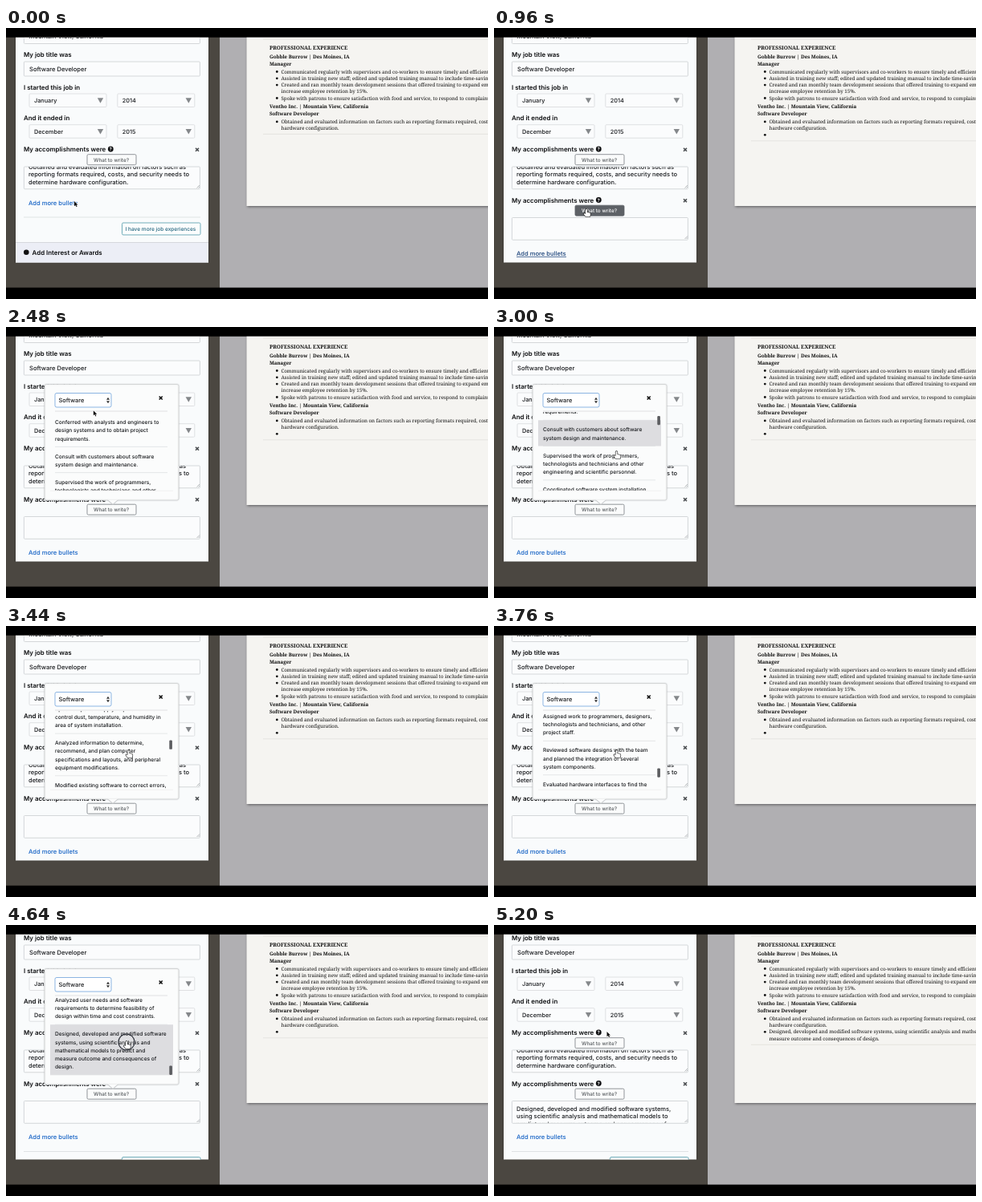
Recreate the animation shown at these times as an HTML page with a canvas. Size 600 by 338 pixels, loop 5.24 s.

```html
<!DOCTYPE html>
<html lang="en">
<head>
<meta charset="utf-8">
<title>Resume builder</title>
<style>
html, body { margin: 0; width: 100%; height: 100%; overflow: hidden; background: #000; }
canvas { display: block; width: 600px; height: 338px; }
</style>
</head>
<body>
<canvas id="stage"></canvas>
<script>
const LOOP = 5240;
const canvas = document.getElementById('stage');
const c = canvas.getContext('2d');
const dpr = window.devicePixelRatio || 1;
canvas.width = 600 * dpr;
canvas.height = 338 * dpr;

const SANS = 'Inter, "Open Sans", sans-serif';
const SERIF = '"Noto Serif", serif';
const INK = '#17191c', LINK = '#1260c4';

// moments of the interaction
const ADDED = 360, OPENED = 1160, LISTED = 1640, CHOSEN = 2320, FILLED = 4680;
const CLICKS = [220, 1020, LISTED, 2200, 4540];

// time, x, y of the pointer tip
const POINTER = [
  [0, 85, 216], [700, 86, 217], [920, 115, 226], [1140, 115, 226], [1580, 123, 95],
  [1860, 123, 95], [2160, 107, 102], [2440, 107, 102], [2780, 152.5, 155],
  [3900, 152.5, 155], [4180, 150, 145], [4720, 150, 145], [5120, 140.5, 133], [LOOP, 140.5, 133]
];
const LIST_SCROLL = [[2970, 0], [3000, 32.5], [3440, 300.9], [3900, 1e4]];
const SECTORS = ['Restaurant', 'Software', 'Finance', 'Education', 'Retail',
  'Marketing', 'Sales', 'Accounting', 'Public Relations'];

const split = s => s.trim().split('\n').map(item => item.split('/'));
const RESTAURANT = split(`
Arranged food for co-workers requested by/guests at the gala; makes donor events.
Communicated regularly with supervisors/and co-workers to ensure timely and/efficient work at large-scale events.
Conducted regular detailed inventory of/stock to ensure accurate documentation for/weekly supply orders.`);
const SOFTWARE = split(`
Conferred with analysts and engineers to/design systems and to obtain project/requirements.
Consult with customers about software/system design and maintenance.
Supervised the work of programmers,/technologists and technicians and other/engineering and scientific personnel.
Coordinated software system installation/and monitored equipment functioning to/ensure specifications were met.
Stored, retrieved, and manipulated data/for analysis of system capabilities and/requirements.
Trained users to work with new or/modified equipment and wrote clear/operating instructions.
Determined system performance standards/and reported on the progress of every/project.
Specified power supply requirements to/control dust, temperature, and humidity in/area of system installation.
Analyzed information to determine,/recommend, and plan computer/specifications and layouts, and peripheral/equipment modifications.
Modified existing software to correct errors,/adapt it to new hardware, or upgrade/interfaces and improve performance.
Developed and directed software system/testing and validation procedures,/programming, and documentation.
Monitored functioning of equipment to/ensure the system operates in conformance/with specifications.
Prepared reports and correspondence about/project specifications, activities, and/status.
Obtained and evaluated information on/factors such as reporting formats required,/costs, and security needs.
Assigned work to programmers, designers,/technologists and technicians, and other/project staff.
Reviewed software designs with the team/and planned the integration of several/system components.
Evaluated hardware interfaces to find the/operational requirements and the expected/system performance.
Analyzed user needs and software/requirements to determine feasibility of/design within time and cost constraints.
Designed, developed and modified software/systems, using scientific analysis and/mathematical models to predict and/measure outcome and consequences of/design.`);
const itemHeight = lines => lines.length * 10.2 + 11.8;
const total = items => items.reduce((sum, lines) => sum + itemHeight(lines), 0);

const ARROW = new Path2D('M0 0v6.2l1.5-1.3 1.1 2.4 1-.5-1.1-2.3h2z');
const HAND = new Path2D('M-1 1a1 1 0 0 1 2 0v3l3 .6q1.2 .3 1 1.6l-.6 3H-.8l-2.4-3q0-1.2 1.2-.9l1 .8z');

function ramp(keys, t, ease = k => k) {
  const i = keys.findIndex(k => k[0] > t);
  if (i === 0) return keys[0].slice(1);
  if (i < 0) return keys[keys.length - 1].slice(1);
  const a = keys[i - 1], b = keys[i], k = ease((t - a[0]) / (b[0] - a[0]));
  return a.slice(1).map((v, n) => v + (b[n + 1] - v) * k);
}
const smooth = k => k * k * (3 - 2 * k);

function text(s, x, y, size = 7.5, color = INK, weight = 500, family = SANS) {
  c.font = `${weight} ${size}px ${family}`;
  c.fillStyle = color;
  c.fillText(s, x, y);
}
const label = (s, y, x = 22) => text(s, x, y, 7.9, '#0c0d0f', 600);

function box(x, y, w, h, fill, stroke, r = 0) {
  c.beginPath();
  c.roundRect(x, y, w, h, r);
  if (fill) { c.fillStyle = fill; c.fill(); }
  if (stroke) { c.strokeStyle = stroke; c.lineWidth = .8; c.stroke(); }
}
function shadowed(alpha, blur, offset, draw) {
  c.save();
  c.shadowColor = `rgba(0,0,0,${alpha})`;
  c.shadowBlur = blur * dpr;
  c.shadowOffsetY = offset * dpr;
  draw();
  c.restore();
}
function line(x1, y1, x2, y2, color, width = .7) {
  c.beginPath();
  c.moveTo(x1, y1);
  c.lineTo(x2, y2);
  c.strokeStyle = color;
  c.lineWidth = width;
  c.stroke();
}
function disc(x, y, r, color) {
  c.beginPath();
  c.arc(x, y, r, 0, 7);
  c.fillStyle = color;
  c.fill();
}
function triangle(x, y, w, h, color) {
  c.beginPath();
  c.moveTo(x - w / 2, y);
  c.lineTo(x + w / 2, y);
  c.lineTo(x, y + h);
  c.fillStyle = color;
  c.fill();
}
function cross(x, y, color) {
  line(x - 2, y - 2, x + 2, y + 2, color, 1.6);
  line(x - 2, y + 2, x + 2, y - 2, color, 1.6);
}
function clipped(x, y, w, h, draw) {
  c.save();
  c.beginPath();
  c.rect(x, y, w, h);
  c.clip();
  draw();
  c.restore();
}

function field(y, h) { box(22.4, y, 219, h, '#fbfcfd', '#cbced1', 1); }
function select(s, x, y) {
  box(x, y, 96, 16.5, '#fbfcfd', '#d8dadc', 1);
  text(s, x + 6, y + 11.4, 7.3);
  triangle(x + 88.5, y + 5.2, 7.4, 6.6, '#85888b');
}

function accomplishment(y, lines, first, hover) {
  label('My accomplishments were', y + 3);
  disc(130.3, y, 3.4, '#0c0d0f');
  text('?', 128.6, y + 2.3, 6, '#fff', 700);
  cross(238, y + .7, '#4a4d50');
  field(y + 22, 27.8);
  line(237.5, y + 48.5, 241, y + 45, '#8a8d90', .6);
  line(239.5, y + 48.5, 241, y + 47, '#8a8d90', .6);
  clipped(22, y + 22.3, 220, 27, () =>
    lines.forEach((s, i) => text(s, 28, y + first + i * 9.5)));
  box(101, y + 6.7, 61, 13, hover ? '#5d6166' : '#fafbfb', hover ? '#5d6166' : '#777b80', 1.5);
  text('What to write?', 109, y + 15.6, 6.4, hover ? '#fff' : '#54585c');
}

function form(t, added) {
  field(0, 19.5);
  text('Mountain View, California', 28.5, 13, 7.6);
  label('My job title was', 36);
  field(42, 18);
  text('Software Developer', 29, 54, 7.55);
  label('I started this job in', 77);
  select('January', 29, 82);
  select('2014', 138.8, 82);
  label('And it ended in', 115);
  select('December', 29, 120.7);
  select('2015', 138.8, 120.7);
  accomplishment(151, ['Obtained and evaluated information on factors such as',
    'reporting formats required, costs, and security needs to',
    'determine hardware configuration.'], 24.9);
  if (added) {
    const hover = t > 860 && t < OPENED;
    accomplishment(214.5, t < FILLED ? [] : ['Designed, developed and modified software systems,',
      'using scientific analysis and mathematical models to',
      'predict and measure outcome and consequences of', 'design.'], 34, hover);
  }
  c.save();
  c.translate(0, added ? 63.5 : 0);
  const focus = added && t < OPENED;
  text('Add more bullets', 28, 220.5, 7.6, focus ? '#173f78' : LINK);
  if (focus) line(28, 222, 90, 222, '#173f78', .7);
  line(22, 236, 242, 236, '#d5d8da');
  box(144.5, 243, 97.5, 15, '#fbfdfd', '#4c97a8', 1.5);
  text('I have more job experiences', 148.5, 253, 6.55, '#23657f');
  box(12, 267.5, 240, 60, '#eceef6');
  line(12, 267.5, 252, 267.5, '#c9ccd2');
  disc(25.3, 279.8, 3.3, '#111');
  label('Add Interest or Awards', 282.8, 32.6);
  c.restore();
}

function list(items, scroll, hovered) {
  clipped(49, 106, 165, 98, () => {
    let y = 107 - scroll;
    items.forEach((lines, i) => {
      const h = itemHeight(lines);
      if (i === hovered) box(55, y, 153, h, '#dddde0');
      lines.forEach((s, n) => text(s, 61, y + 14.1 + n * 10.2, 6.58));
      line(61, y + h, 201, y + h, '#dcdee0');
      y += h;
    });
  });
  line(61, 105, 201, 105, '#d3d5d7');
  line(55, 204.3, 208, 204.3, '#ecedee');
}

function popup(t) {
  shadowed(.12, 2, 0, () => box(48, 71.5, 167, 144.5, '#fbfcfc', '#cfd1d2', 2));
  triangle(133, 216, 14, 6, '#c8cacc');
  triangle(133, 215.4, 12.5, 5.4, '#fbfcfc');
  cross(192.7, 88.5, '#111');

  const chosen = t >= CHOSEN;
  box(61, 82.5, 70, 17.5, '#fff', chosen ? '#6fa3dc' : '#bbb', 2);
  text(chosen ? 'Software' : 'Restaurant', 65.5, 94.3, 7.4);
  triangle(127, 90.7, 4, -3, '#333');
  triangle(127, 92.3, 4, 3, '#333');

  const items = chosen ? SOFTWARE : RESTAURANT;
  const height = total(items);
  const scroll = chosen ? listScroll(t, height - 97) : 0;
  const hovered = t >= 4080 ? items.length - 1 : t > 2700 && scroll < 60 ? 1 : -1;
  list(items, scroll, chosen ? hovered : -1);
  if (t > 2960) box(203.3, 107 + scroll / height * 97, 3.6, 97 * 97 / height, '#5c5d60', null, 1.2);

  if (t >= LISTED && !chosen) sectors(t > 1980 ? 1 : 0);
}
function listScroll(t, max) {
  const keys = LIST_SCROLL.map(([time, y]) => [time, Math.min(y, max)]);
  return ramp(keys, t)[0];
}
function sectors(active) {
  shadowed(.35, 4, 1.5, () => box(56, 84.5, 76, 100, '#e1e3e7', '#c5c6c8', 2.5));
  box(56, 86.2 + active * 10.57, 76, 10.6, '#2b6fe3');
  SECTORS.forEach((s, i) => text(s, 66.3, 94 + i * 10.57, 7.2, i === active ? '#fff' : INK));
  c.beginPath();
  c.moveTo(58.8, 91.5);
  c.lineTo(60.5, 93.7);
  c.lineTo(63.3, 89);
  c.strokeStyle = active ? INK : '#fff';
  c.lineWidth = 1;
  c.stroke();
}

function resume(t, added) {
  shadowed(.5, 3, 1, () => box(299.5, 0, 310, 222, '#f5f4f1'));
  const serif = (s, x, y, size = 6.17, weight = 400) => text(s, x, y, size, '#0e0e0e', weight, SERIF);
  const head = (s, y) => serif(s, 328, y, 6.15, 600);
  const bullet = (y, ...lines) => {
    disc(337.3, y - 2, 1.4, '#111');
    lines.forEach((s, i) => serif(s, 342.5, y + i * 8.2));
  };
  line(320, 14, 600, 14, '#dddcd9');
  serif('PROFESSIONAL EXPERIENCE', 328, 27, 6.6, 600);
  head('Gobble Burrow | Des Moines, IA', 38);
  head('Manager', 47.2);
  bullet(56.5, 'Communicated regularly with supervisors and co-workers to ensure timely and efficient');
  bullet(64.8, 'Assisted in training new staff; edited and updated training manual to include time-saving');
  bullet(73.1, 'Created and ran monthly team development sessions that offered training to expand employee',
    'increase employee retention by 15%.');
  bullet(89.5, 'Spoke with patrons to ensure satisfaction with food and service, to respond to complaints');
  head('Ventho Inc. | Mountain View, California', 100.2);
  head('Software Developer', 109.2);
  bullet(118.9, 'Obtained and evaluated information on factors such as reporting formats required, costs, and',
    'hardware configuration.');
  const filled = t >= FILLED;
  if (filled) bullet(135.3, 'Designed, developed and modified software systems, using scientific analysis and mathematical',
    'measure outcome and consequences of design.');
  else if (added) bullet(135.3);
  const end = filled ? 149.3 : added ? 140.8 : 132.3;
  line(320, end, 600, end, '#dddcd9');
}

function pointer(t) {
  const [x, y] = ramp(POINTER, t, smooth);
  if (CLICKS.some(at => t >= at && t < at + 150)) {
    c.beginPath();
    c.arc(x, y + 1, 10, 0, 7);
    c.fillStyle = 'rgba(255,255,255,.1)';
    c.fill();
    c.strokeStyle = '#2b2f38';
    c.lineWidth = 1.2;
    c.stroke();
  }
  const hand = (t > 180 && t < OPENED) || (t > 2660 && t < FILLED + 40);
  const shape = hand ? HAND : ARROW;
  c.save();
  c.translate(x, y);
  c.lineJoin = 'round';
  c.lineWidth = hand ? 1.3 : 1.2;
  c.strokeStyle = hand ? '#222' : '#fff';
  c.fillStyle = hand ? '#fff' : '#111';
  c.stroke(shape);
  c.fill(shape);
  c.restore();
}

function draw() {
  const t = performance.now() % LOOP;
  const added = t >= ADDED;
  const pageScroll = ramp([[3920, 0], [4080, 17]], t, smooth)[0];
  c.setTransform(dpr, 0, 0, dpr, 0, 0);
  c.textRendering = 'geometricPrecision';
  box(0, 0, 600, 338, '#000');
  clipped(0, 11.8, 600, 312, () => {
    box(266, 0, 334, 338, '#b0afb2');
    resume(t, added);
    box(0, 0, 266, 338, '#4b4741');
    shadowed(.4, 2, 0, () => box(12, 0, 240, 292.4, '#f9fbfc'));
    clipped(12, 11.8, 240, 280.6, () => {
      c.translate(0, -pageScroll);
      form(t, added);
      if (t >= OPENED && t < FILLED) popup(t);
    });
  });
  pointer(t);
  requestAnimationFrame(draw);
}
draw();
</script>
</body>
</html>
```
